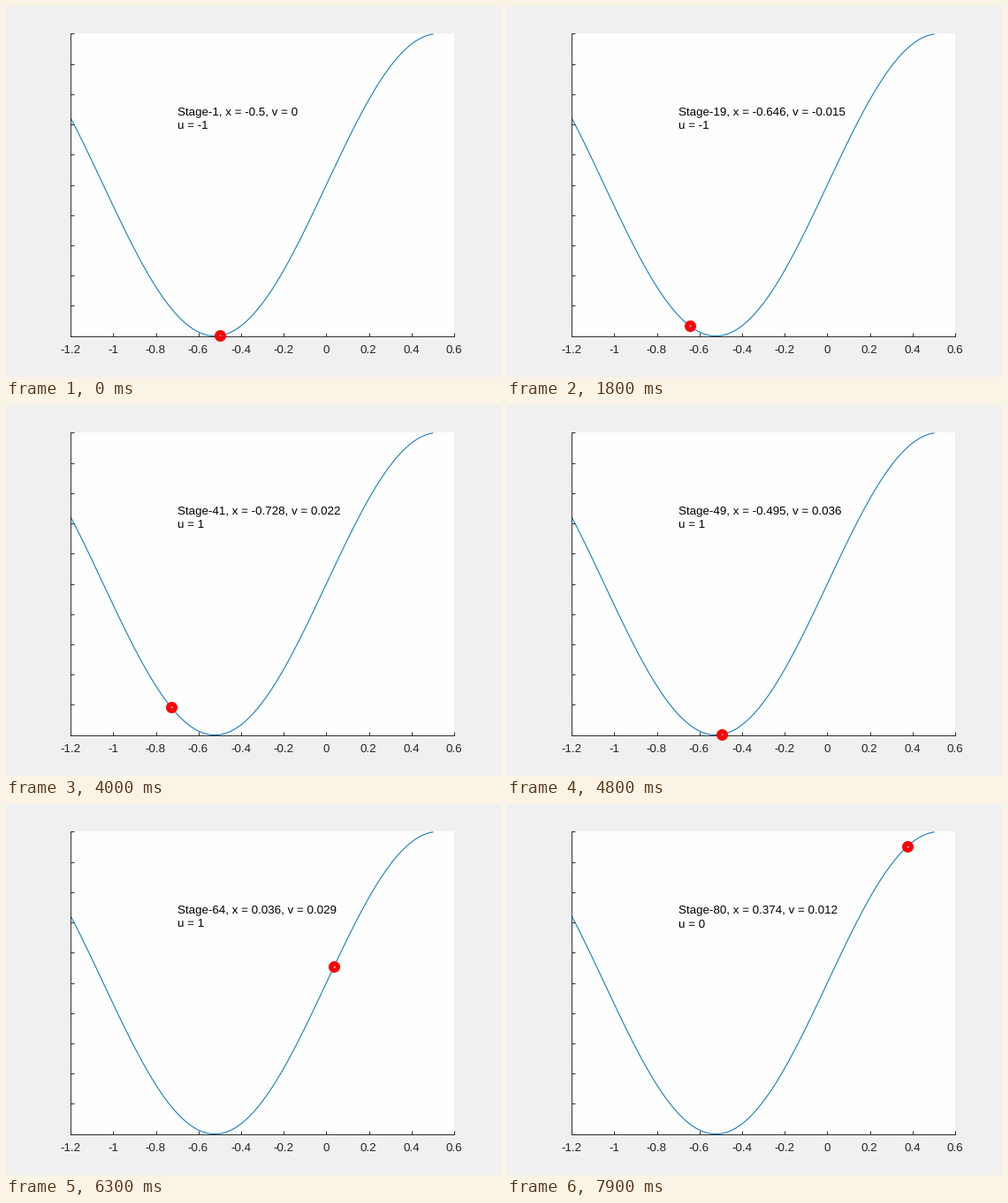
These frames come from a looping animation (560x420 px, 8 s). A matplotlib script:

```python
import numpy as np
import matplotlib.pyplot as plt
from matplotlib.animation import FuncAnimation

W, H, DPI = 560, 420, 100
PX = 72 / DPI  # points per pixel
HAIR = 0.95 * PX
LEFT, RIGHT, TOP, BOTTOM = 73.2, 507, 31.4, 373.6
STAGES = 80
INK = "#262626"

plt.rcParams.update({"font.family": "Liberation Sans", "font.size": 13.33 * PX,
                     "text.hinting": "none"})

# Known states of the car: stage -> (position, velocity)
KEYS = {1: (-0.5, 0), 11: (-0.545, -0.01), 28: (-0.769, -0.01),
        41: (-0.728, 0.022), 57: (-0.197, 0.036),
        72: (0.238, 0.021), 80: (0.374, 0.012)}


def control(stage):
    if stage < 27:
        return -1
    return 1 if 32 <= stage < 76 else 0


def leg(start, end):
    """Mountain car steps from one known state, eased to meet the next."""
    n = end - start
    path = [KEYS[start]]
    for stage in range(start, end):
        x, v = path[-1]
        path.append((x + v, v + 0.001 * control(stage) - 0.0025 * np.cos(3 * x)))
    path = np.array(path)
    dx, dv = np.array(KEYS[end]) - path[-1]
    s = np.linspace(0, 1, n + 1)
    path[:, 0] += dx * (3 * s**2 - 2 * s**3) + n * dv * (s**3 - s**2)
    path[:, 1] += dx * 6 * (s - s**2) / n + dv * (3 * s**2 - 2 * s)
    return path


stops = list(KEYS)
legs = [leg(a, b) for a, b in zip(stops, stops[1:])]
states = np.vstack([p[:-1] for p in legs] + [legs[-1][-1:]])


def short(value):
    return f"{round(value, 3) + 0.0:g}"


fig = plt.figure(figsize=(W / DPI, H / DPI), dpi=DPI, facecolor="#f0f0f0")
ax = fig.add_axes([LEFT / W, 1 - BOTTOM / H, (RIGHT - LEFT) / W, (BOTTOM - TOP) / H],
                  facecolor="#fefefe")
ax.set(xlim=(-1.2, 0.6), ylim=(-1, 1))
ax.spines[["top", "right"]].set_visible(False)
for side in ("left", "bottom"):
    ax.spines[side].set(color=INK, linewidth=HAIR)
xticks = np.linspace(-1.2, 0.6, 10)
ax.set_xticks(xticks, [])
ax.set_yticks(np.linspace(-1, 1, 11), [])
ax.tick_params(direction="in", length=4.3 * PX, width=HAIR, color=INK)


def label(x, baseline, text="", **style):
    return fig.text(x / W, 1 - baseline / H, text, va="baseline", **style)


for x in xticks:
    px = LEFT + (x + 1.2) / 1.8 * (RIGHT - LEFT)
    label(px - 0.5, 393, short(x), ha="center", color=INK)

hill = np.linspace(-1.2, 0.5, 171)
ax.plot(hill, np.sin(3 * hill), color="#0072bd", lw=PX, clip_on=False)
car, = ax.plot([], [], "o", mfc="none", mec="red", ms=7.7 * PX, mew=5.3 * PX,
               clip_on=False, zorder=5)
status = label(193.8, 123, color="black")
action = label(193.8, 140, color="black")


def draw(i):
    x, v = states[i]
    car.set_data([x], [np.sin(3 * x)])
    status.set_text(f"Stage-{i + 1}, x = {short(x)}, v = {short(v)}")
    action.set_text(f"u = {control(i + 1)}")
    return car, status, action


anim = FuncAnimation(fig, draw, frames=STAGES, interval=100, repeat=True,
                     repeat_delay=0)
plt.show()
```
